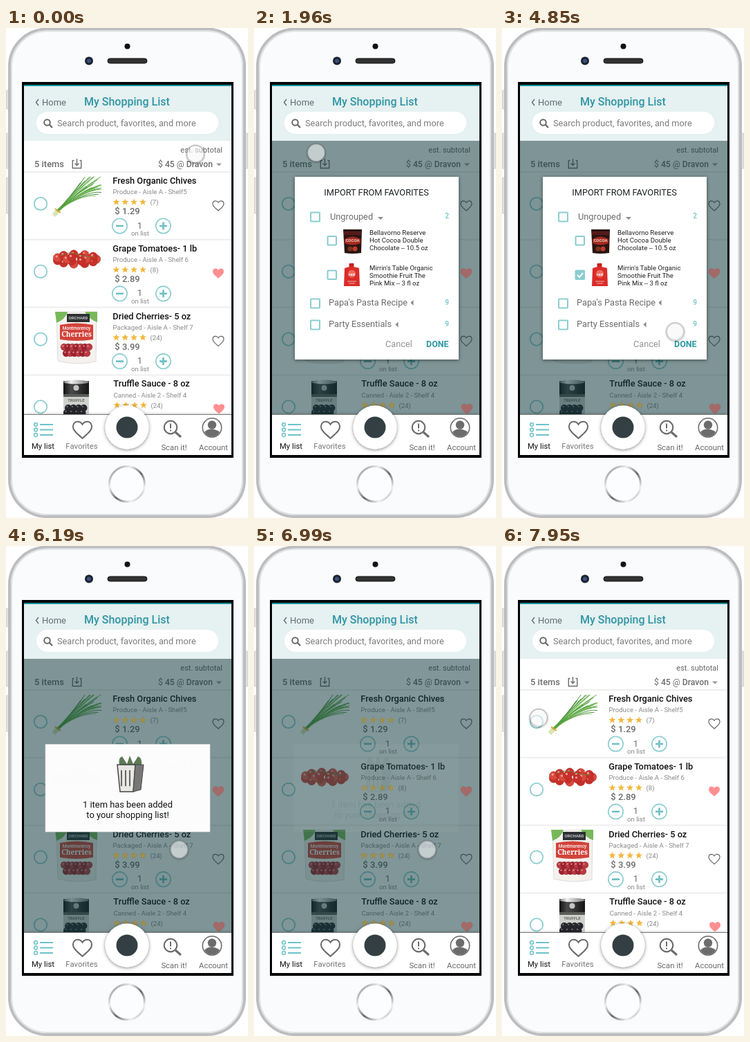
An HTML page for the animation above (7.99 s loop, 350 px wide and 708 px high).

```html
<!DOCTYPE html>
<html lang="en">
<head>
<meta charset="utf-8">
<title>Shopping list</title>
<style>
html, body { margin: 0; width: 100%; height: 100%; overflow: hidden; background: #fff; }
svg { display: block; width: 350px; height: 708px; font-family: Roboto, Arial, sans-serif; }
#menu, #dim, #modal, #tick, #toast, #cx, #cy { animation: 7990ms linear infinite; }
#menu { animation-name: menu; }
#dim { animation-name: dim; }
#modal { animation-name: modal; }
#tick { animation-name: tick; }
#toast { animation-name: toast; }
#cx { animation-name: cx; }
#cy { animation-name: cy; }

@keyframes menu {
  0%, 2.75% { opacity: 0; }
  3.25%, 9.9% { opacity: 1; }
  13.27%, 100% { opacity: 0; }
}
@keyframes dim {
  0%, 22.3% { opacity: 0; }
  24.5%, 87.48% { opacity: 1; }
  89.49%, 100% { opacity: 0; }
}
@keyframes modal {
  0%, 22.3% { opacity: 0; }
  24.5%, 64.95% { opacity: 1; }
  64.951%, 100% { opacity: 0; }
}
@keyframes tick {
  0%, 40.9% { opacity: 0; }
  41%, 100% { opacity: 1; }
}
@keyframes toast {
  0%, 64.95% { opacity: 0; }
  64.951%, 77.3% { opacity: 1; }
  88%, 100% { opacity: 0; }
}
@keyframes cx {
  0%, .3% { transform: translateX(274px); }
  .87%, 19.1% { transform: translateX(270px); animation-timing-function: ease-in-out; }
  22.3%, 29.5% { transform: translateX(90px); animation-timing-function: ease-in-out; }
  34% { transform: translateX(164px); animation-timing-function: ease-in-out; }
  39.42% { transform: translateX(100px); }
  41.5%, 54% { transform: translateX(107px); animation-timing-function: ease-in-out; }
  58.6% { transform: translateX(263px); animation-timing-function: ease-in-out; }
  60.65%, 93.2% { transform: translateX(250.5px); animation-timing-function: ease-in-out; }
  99.5%, 100% { transform: translateX(53px); }
}
@keyframes cy {
  0%, .3% { transform: translateY(182px); }
  .87%, 19.1% { transform: translateY(190px); animation-timing-function: ease-in-out; }
  22.3%, 29.5% { transform: translateY(180px); animation-timing-function: ease-in-out; }
  39.42% { transform: translateY(333px); }
  41.5%, 54% { transform: translateY(339px); animation-timing-function: ease-in-out; }
  58.6% { transform: translateY(447px); animation-timing-function: ease-in-out; }
  60.65%, 93.2% { transform: translateY(438.5px); animation-timing-function: ease-in-out; }
  99.5%, 100% { transform: translateY(248px); }
}
</style>
</head>
<body>
<svg viewBox="0 0 350 708">
  <defs>
    <linearGradient id="rim" x2="1" y2="1">
      <stop offset="0" stop-color="#777"/><stop offset=".3" stop-color="#eee"/>
      <stop offset=".55" stop-color="#666"/><stop offset=".8" stop-color="#f2f2f2"/><stop offset="1" stop-color="#888"/>
    </linearGradient>
    <linearGradient id="tin">
      <stop offset="0" stop-color="#777"/><stop offset=".3" stop-color="#f0f0f0"/><stop offset="1" stop-color="#777"/>
    </linearGradient>
    <linearGradient id="can">
      <stop offset="0" stop-color="#111"/><stop offset=".3" stop-color="#4a4a4a"/><stop offset="1" stop-color="#151515"/>
    </linearGradient>
    <radialGradient id="halo">
      <stop offset=".78" stop-opacity="0"/><stop offset=".8" stop-opacity=".22"/><stop offset="1" stop-opacity="0"/>
    </radialGradient>
    <filter id="soft" x="-30%" y="-30%" width="160%" height="160%">
      <feDropShadow dx="0" dy="1" stdDeviation="2.5" flood-opacity=".5"/>
    </filter>
    <clipPath id="screen"><path d="M26 82H326V617H26Z"/></clipPath>
    <path id="heart" d="M0 7C-3 4-8 1-8-3C-8-6-6-7.2-4-7.2C-2-7.2-.7-6 0-4.8C.7-6 2-7.2 4-7.2C6-7.2 8-6 8-3C8 1 3 4 0 7Z"/>
    <path id="star" d="M0-5 1.5-1.6 5-1.5 2.2.8 3.1 4.3 0 2.3-3.1 4.3-2.2.8-5-1.5-1.5-1.6Z"/>
  </defs>

  <g fill="#e2e2e2" stroke="#bbb" stroke-width=".6">
    <rect x=".3" y="90" width="4" height="27" rx="1"/>
    <rect x=".3" y="152" width="4" height="51" rx="1"/>
    <rect x=".3" y="216" width="4" height="52" rx="1"/>
    <rect x="345.700" y="152" width="4" height="51" rx="1"/>
  </g>
  <rect x="5" y="1.500" width="340" height="704.500" rx="54" fill="#f9fbfd" stroke="#bcbdbf" stroke-width="4"/>
  <rect x="8" y="4.500" width="334" height="698.500" rx="51" fill="none" stroke="#dfe1e3" stroke-width="2"/>
  <circle cx="175.5" cy="26.5" r="4" fill="#111"/>
  <circle cx="120" cy="47.5" r="6" fill="#1b2230"/>
  <circle cx="120" cy="47.5" r="3" fill="#3c4f7c"/>
  <rect x="147" y="44" width="57" height="7" rx="3.5" fill="#333" stroke="#111"/>
  <circle cx="175" cy="659" r="25.5" fill="#fcfdfe" stroke="url(#rim)" stroke-width="3"/>
  <path d="M23 78H329V621H23Z"/>

  <g clip-path="url(#screen)">
    <path d="M26 82H326V617H26Z" fill="#fff"/>
    <g id="list"></g>
    <g id="dim">
      <path d="M26 163H326V560H26Z" fill="#123a3e" opacity=".54"/>
      <g id="glow"></g>
    </g>
    <g id="head"></g>
    <g id="tabs"></g>
    <g id="menu"></g>
    <g id="modal"></g>
    <g id="toast"></g>
  </g>
  <g id="cy"><g id="cx">
    <circle cy=".8" r="15.500" fill="url(#halo)"/>
    <circle r="12.300" fill="#f6f6f6" fill-opacity=".58" stroke="#999" stroke-opacity=".5" stroke-width="1.200"/>
  </g></g>
</svg>
<script>
const teal = '#8bcdd0', gray = '#6c6c6c';
const put = (id, ...parts) => { document.getElementById(id).innerHTML += parts.join(''); };
const text = (x, y, s, size, fill = gray, weight = 400, anchor = 'start') =>
  `<text x="${x}" y="${y}" font-size="${size}" fill="${fill}" font-weight="${weight}" text-anchor="${anchor}">${s}</text>`;
const path = (d, fill = 'none', stroke = 'none', w = 1) =>
  `<path d="${d}" fill="${fill}" stroke="${stroke}" stroke-width="${w}"/>`;
const dot = (x, y, r, fill = 'none', stroke = 'none', w = 1) =>
  `<circle cx="${x}" cy="${y}" r="${r}" fill="${fill}" stroke="${stroke}" stroke-width="${w}"/>`;
const box = (x, y, w, h, fill, more = '') =>
  `<rect x="${x}" y="${y}" width="${w}" height="${h}" fill="${fill}" ${more}/>`;
const use = (id, x, y, attrs, scale = 1) =>
  `<use href="#${id}" transform="translate(${x} ${y}) scale(${scale})" ${attrs}/>`;
const times = (n, f) => Array.from({ length: n }, (_, i) => f(i)).join('');
let seed = 7;
const rnd = () => (seed = seed * 16807 % 2147483647) / 2147483647;

// product pictures
function chives() {
  const greens = ['#3f8a33', '#5fae45', '#8cc96a', '#4a9a3c'];
  return times(34, i => {
    const a = .34 + .56 * rnd(), len = 55 + 33 * rnd();
    const x = Math.min(70 + len * Math.cos(a), 138), y = Math.max(266 - len * Math.sin(a), 215);
    const bend = a * .35 + .5;
    return path(`M71 ${265 + rnd() * 5}Q${73 + len * .6 * Math.cos(bend)} ${264 - len * .6 * Math.sin(bend)} ${x} ${y}`,
      'none', greens[i % 4], .9);
  }) + path('M67 269L71 263L77 267L71 273Z', '#dbe3b1') + path('M71 261L79 267', 'none', '#e3a73c', 2);
}
function tomatoes() {
  return times(17, i => {
    const ring = i < 11, a = i * (ring ? 2 * Math.PI / 11 : Math.PI / 3);
    const x = 102 + (ring ? 28.500 : 14) * Math.cos(a), y = 334 + (ring ? 7 : 3) * Math.sin(a);
    return dot(x, y, 6.2, i % 3 ? '#c8302a' : '#d94a3e', '#a3231d', .5) + dot(x - 1.5, y - 2, 1.6, '#f2a096');
  }) + path('M78 329Q92 322 104 327T128 330', 'none', '#7a7a3c', 1);
}
function cherries() {
  return path('M73 411L131 410L130 482Q102 488 75 481Z', '#f5f2ee', '#ddd') +
    path('M71 410H89Q86 421 73 426ZM114 410H132V425Q120 421 114 410Z', '#78b85a') +
    box(88, 413, 33, 12, '#2f3234') + text(104.5, 421, 'ORCHARD', 6, '#ddd', 500, 'middle') +
    path('M78 429Q102 424 126 429V450Q102 454 78 450Z', '#d2433a') +
    text(102, 436, 'Montmorency', 6.5, '#fff', 500, 'middle') +
    `<text x="102" y="446" font-size="10" font-weight="700" fill="#fff" text-anchor="middle" style="font-family:'Noto Serif',serif">Cherries</text>` +
    times(13, i => {
      const x = 84 + i % 7 * 6 + (i > 6 ? 3 : 0), y = i > 6 ? 470 : 461;
      return dot(x, y, 4.8, i % 2 ? '#9c2230' : '#bb3a40', '#7a1822', .5) + dot(x - 1.5, y - 1.5, 1.1, '#eba9a5');
    });
}
function can() {
  return box(83, 510, 37, 20, 'url(#can)') + box(83, 529, 37, 36, '#cfd1cd') +
    `<ellipse cx="101.5" cy="511.500" rx="18.500" ry="3" fill="url(#tin)"/>` +
    dot(101.5, 520, 4, '#c4c4c4') + box(83, 529, 37, 4, '#5a5d5a') + text(101.5, 540, 'TRUFFLE', 6, '#555', 500, 'middle') +
    times(9, i => {
      const x = 90 + i % 4 * 7.500 + (i > 3 ? -2 : 0), y = i > 3 ? 556 : 549;
      return dot(x, y, 5, '#26262c') + dot(x - 1.5, y - 2, 1, '#888');
    });
}

// list
const items = [
  ['Fresh Organic Chives', 'Produce - Aisle A - Shelf5', 7, '1.29'],
  ['Grape Tomatoes- 1 lb', 'Produce - Aisle A - Shelf 6', 8, '2.89'],
  ['Dried Cherries- 5 oz', 'Packaged - Aisle A - Shelf 7', 24, '3.99'],
  ['Truffle Sauce - 8 oz', 'Canned - Aisle 2 - Shelf 4', 24, '4.59']
];
const stars = (dx, dy, fill) => times(4, k => use('star', 159.5 + dx + k * 12.8, 251.5 + dy, `fill="${fill}"`));
items.forEach(([name, place, votes, price], i) => {
  const dy = i * 97.8, dx = i === 3 ? 1 : 0, liked = i % 2, y = dy + 286;
  put('list',
    path(`M26 ${208 + dy}H326`, 'none', '#eee', 2),
    dot(50, 254 + dy, 9.2, 'none', teal, 1.8),
    text(154.3 + dx, 225 + dy, name, 12.8, '#111', 500),
    text(154.5 + dx, 240.3 + dy, place, 9.6, '#8a8a8a'),
    stars(dx, dy, '#f3b73e'),
    text(208.5 + dx, 255.3 + dy, `(${votes})`, 9.6, '#8a8a8a'),
    text(157.3 + dx, 269.3 + dy, `$ ${price}`, 13, gray, 500),
    dot(164.5, y, 10.7, 'none', teal, 1.6), dot(227.5, y, 10.7, 'none', teal, 1.6),
    path(`M159 ${y}h11M222 ${y}h11M227.5 ${y - 5.5}v11`, 'none', '#6fbfc4', 2.6),
    text(193.5, 289.5 + dy, '1', 13, gray, 400, 'middle'),
    text(194, 300 + dy, 'on list', 9.6, '#858585', 400, 'middle'),
    use('heart', 307 + dx, 257 + dy, liked ? 'fill="#ff8f90"' : 'fill="none" stroke="#666" stroke-width="1.2"'));
  put('glow', stars(dx, dy, '#a08f4c'),
    liked ? use('heart', 307 + dx, 257 + dy, 'fill="#a36a69" stroke="#a36a69" stroke-width=".5"') : '');
});
put('list', chives(), tomatoes(), cherries(), can(),
  text(313, 180, 'est. subtotal', 11, '#666', 400, 'end'),
  text(41, 201.3, '5 items', 12.9, gray, 500),
  path('M98.500 191.500H96.300V202.500H108.700V191.500H106.500M102.500 189V198.500M99.500 195.500L102.500 198.500L105.500 195.500', 'none', gray, 1.4),
  text(299, 201.3, '$ <tspan font-weight="500">45</tspan> @ <tspan font-weight="500">Dravon</tspan>', 12.2, gray, 400, 'end'),
  path('M304 195.5h8l-4 4Z', '#999'));

// header
put('head',
  box(26, 82, 300, 81, '#e6f1f1'), box(26, 82, 300, 2, '#17929d'),
  path('M47 103L43.5 107.5L47 112', 'none', '#5f6e70', 1.4),
  text(52, 112.3, 'Home', 13, '#5f6e70'),
  text(113, 112.3, 'My Shopping List', 16, '#3096a5', 500),
  box(44, 121, 263, 32, '#fff', 'rx="16"'),
  dot(59.5, 136.5, 4.3, 'none', '#666', 1.9), path('M62.7 139.7L67 144', 'none', '#666', 2.2),
  text(74, 142, 'Search product, favorites, and more', 12.75, '#7b7b7b'));

// tab bar
put('tabs',
  box(26, 558.5, 300, 60, '#fff', 'filter="url(#soft)"'), path('M26 558.5H326', 'none', '#777', 1),
  times(3, i => dot(43, 573 + i * 7.5, 2.4, 'none', '#6cc3c9', 1.5) + path(`M49 ${573 + i * 7.5}H68`, 'none', '#6cc3c9', 2)),
  text(53.5, 608, 'My list', 11.3, '#111', 400, 'middle'),
  use('heart', 110.5, 581, 'fill="none" stroke="#6b6b6b" stroke-width="1.2"', 1.7),
  text(109.5, 608, 'Favorites', 11.4, '#777', 400, 'middle'),
  dot(238, 577, 9.3, 'none', gray, 2.2), path('M245 584L253 591', 'none', gray, 3),
  path('M238 571.5V578.5M238 580.5V582.5', 'none', gray, 2),
  text(243, 610, 'Scan it!', 11.3, '#666', 400, 'middle'),
  dot(298, 577.5, 13.7, '#fff', gray, 1.6), dot(298, 573.5, 6.2, gray),
  path('M287 584Q291 579 298 579.5T309 584Q305 590.500 298 590.500T287 584Z', gray),
  text(300, 610, 'Account', 11.3, '#666', 400, 'middle'),
  `<g filter="url(#soft)">${dot(175, 577, 31.5, '#fff')}</g>`, dot(175, 577, 15.5, '#333f43'));

// store menu
const stores = [[45, 'Dravon'], [47, 'Felmart'], [49, 'Ostrin'], [52, 'Quillby']];
put('menu', box(217, 88, 106, 280, '#fff', 'filter="url(#soft)"'),
  stores.map(([cost, store], i) => text(226, 131 + i * 66, `$ ${cost} @ ${store}`, 12.2, gray, i ? 400 : 500)).join(''));

// import dialog
const check = (x, y, s) => box(x, y, s, s, '#fff', `stroke="${teal}" stroke-width="2" rx="1"`);
const lines = (y, rows) => rows.map((s, i) => text(167, y + i * 11, s, 9.6, '#222')).join('');
put('modal',
  box(59, 215, 237, 264, '#fff', 'filter="url(#soft)"'),
  text(177, 242, 'IMPORT FROM FAVORITES', 12.75, '#1d2226', 400, 'middle'),
  check(82, 266.5, 13), check(106.5, 301, 12.5), check(106.5, 350.5, 12.5),
  check(82, 391.5, 13), check(82, 422.5, 13),
  text(110, 277, 'Ungrouped', 12.75), path('M179 273h8l-4 4Z', '#888'),
  text(108, 401, "Papa's Pasta Recipe", 12.75), path('M230.5 393v8l-4-4Z', '#888'),
  text(108, 432, 'Party Essentials', 12.75), path('M208.5 424.5v8l-4-4Z', '#888'),
  [[2, 275], [9, 400], [9, 431]].map(([n, y]) => text(279, y, n, 10, '#6cc3c9', 500, 'middle')).join(''),
  path('M129 291H156L155 325Q142 327 131 325Z', '#2a1513'), path('M130 294H155V299H130Z', '#571a18'),
  path('M131 305Q142 298 154 305V311Q142 316 131 311Z', '#a62a22'),
  text(142.5, 309, 'COCOA', 6, '#f2d9c4', 700, 'middle'),
  dot(139, 319, 3.5, '#7a3423'), dot(146, 319, 3.5, '#c03a2c'),
  lines(299, ['Bellavorno Reserve', 'Hot Cocoa Double', 'Chocolate -- 10.5 oz']),
  box(137.5, 340, 7, 6, '#c8211f', 'rx="1"'),
  path('M131 347Q141 343 152 347L153 373H130Z', '#da2c29'), dot(141.5, 355, 5.5, '#ef6a5f'),
  text(141.5, 357.5, 'red', 6, '#fff', 700, 'middle'), path('M135 366H148M137 369H146', 'none', '#f3b1aa', 1),
  lines(350, ["Mirrin's Table Organic", 'Smoothie Fruit The', 'Pink Mix -- 3 fl oz']),
  `<g id="tick">${box(106, 350, 13.5, 13.5, teal, 'rx="1"')}${path('M109 357L112 360L117 354', 'none', '#fff', 2)}</g>`,
  text(190, 461, 'Cancel', 12.75, '#949494'), text(249, 461, 'DONE', 12.5, '#2f98a6', 700));

// confirmation
put('toast',
  box(57, 286.5, 238, 126.5, '#fff', 'stroke="#ddd" stroke-width=".6"'),
  path('M164 316Q162 306 168 304L175 315L179 303L184 315L191 304Q197 306 196 316Z', '#5d7a55'),
  path('M161 316H187L184 355H165Z', '#eceae6', '#444', 1.5), path('M187 316H199L195 352L184 355Z', '#777', '#444', 1),
  path('M167 324V347M173 324V347M179 324V347', 'none', '#666', 2),
  text(176, 378, '1 item has been added', 12.9, '#111', 400, 'middle'),
  text(176, 393, 'to your shopping list!', 12.9, '#111', 400, 'middle'));
</script>
</body>
</html>
```
